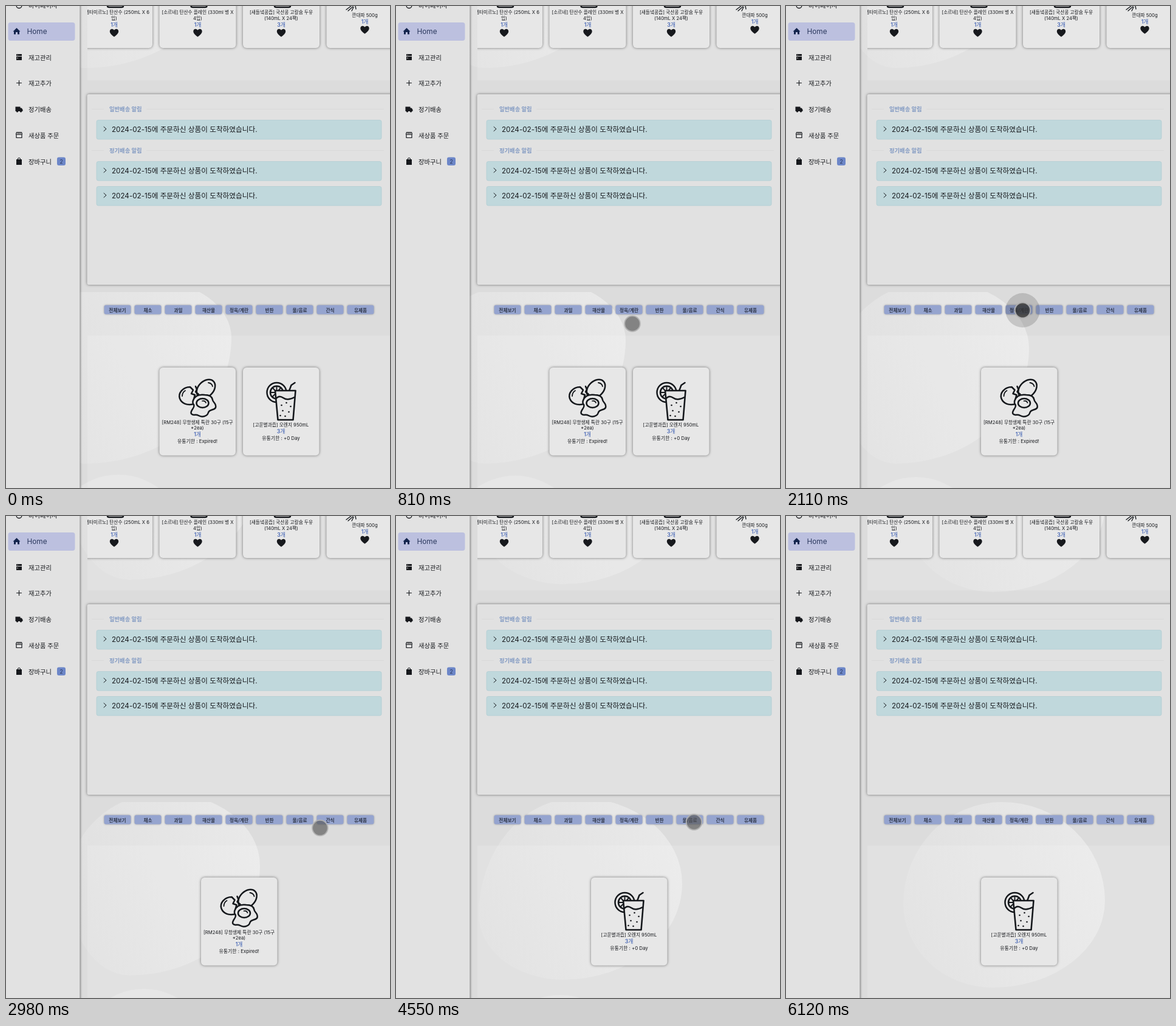
An HTML page that plays this animation: 632 px wide and 792 px high, repeating every 6190 ms.

```html
<!DOCTYPE html>
<html lang="ko">
<head>
<meta charset="utf-8">
<title>재고 알림</title>
<style>
html, body { margin: 0; width: 100%; height: 100%; overflow: hidden; background: #dcdcdc; }
svg { display: block; width: 632px; height: 792px; font-family: Inter, "Noto Sans CJK KR", "Noto Sans CJK", sans-serif; fill: #17191d; }
.mid { text-anchor: middle; }
.line { fill: none; stroke: #14171b; stroke-width: 2.5; stroke-linejoin: round; stroke-linecap: round; }
.card { fill: #e7e7e7; filter: drop-shadow(0 .5px 2px rgba(0,0,0,.5)); }
</style>
</head>
<body>
<svg id="stage" viewBox="0 0 632 792"></svg>
<script>
const LOOP = 6190;

const text = (x, y, size, content, extra = '') =>
  `<text x="${x}" y="${y}" font-size="${size}" ${extra}>${content}</text>`;
const centered = (x, y, size, content, extra = '') => text(x, y, size, content, `class="mid" ${extra}`);
const amount = (x, y, count) => centered(x, y, 8.8, count + '개', 'font-weight="500" fill="#3458b0"');
const rect = (x, y, w, h, r, extra) =>
  `<rect x="${x}" y="${y}" width="${w}" height="${h}" rx="${r}" ${extra}/>`;
const line = (d, width = 2.5, fill = 'none') =>
  `<path class="line" d="${d}" style="stroke-width:${width};fill:${fill}"/>`;

const heart = (x, y) => `<path transform="translate(${x} ${y})"
  d="M0 6.8C-3 4.6-7.2 1.5-7.2-2.4C-7.2-7-2-7.6 0-4.2C2-7.6 7.2-7 7.2-2.4C7.2 1.5 3 4.6 0 6.8Z"/>`;

function favorite(x, names, count, top = 0) {
  const titles = names.map((name, i) => centered(x, 13 + top + i * 10, 7.7, name)).join('');
  const countY = top ? 28.5 : 33.5;
  const icon = top
    ? line('M560 6L568 0M563 8L571 1M569 8L572 2M576 5L575 0', 1.3)
    : line(`M${x - 11}-8V0Q${x - 11} 2 ${x - 8} 2H${x + 12}Q${x + 15} 2 ${x + 15} 0V-8`);
  return rect(x - 63, -80, 126, 149, 6, 'class="card"') + icon + titles +
    amount(x, countY, count) + heart(x, countY + 10.5);
}

const eggs =
  '<ellipse class="line" cx="77" cy="35" rx="12.5" ry="17.5" transform="rotate(45 77 35)"/>' +
  line('M81 25Q87 26 88 31', 1.8) +
  line('M51 32C39 32 31 42 34 51C37 59 46 63 57 60M51 32L56 37L53 43L59 45L57 52', 2.5, '#e7e7e7') +
  line('M38 47Q38 41 43 38', 1.8) + line('M60 31L62 36L60 40L65 44') +
  line(`M56 54C59 46 67 44 75 45C82 45 87 47 88 53C88 57 95 59 93 66C90 71 83 68 81 74
    C79 81 70 82 65 79C60 76 56 80 53 76C50 71 60 66 57 61C55 59 55 57 56 54Z`, 2.5, '#e7e7e7') +
  '<ellipse class="line" cx="71.5" cy="58.5" rx="10" ry="7.5"/>' + line('M71 55Q76 54 77 58', 1.7);

const bubbles = [[64, 62], [72, 58], [79, 64], [66, 71], [76, 73], [70, 80], [62, 79]]
  .map(([x, y]) => `<circle cx="${x}" cy="${y}" r="1.3"/>`).join('');
const juice =
  '<circle class="line" cx="56" cy="41" r="16"/><circle class="line" cx="56" cy="41" r="10.5"/>' +
  line('M56 41H46M56 41L49 33M56 41V31M56 41L63 33M56 41L49 48', 1.9) +
  line('M53.5 38H87L83 86H58Z', 2.6, '#e7e7e7') +
  line('M55 51Q60 45 67 50T85 49') + line('M77 37L80 29L86 25') + bubbles;

function stock(id, icon, names, count, expiry) {
  const first = names.length > 1 ? 92.5 : 97;
  const last = first + 9.5 * (names.length - 1);
  return `<g id="${id}">` + rect(.5, 0, 125.5, 144.5, 6, 'class="card"') + icon +
    names.map((name, i) => centered(63, first + 9.5 * i, 7.7, name)).join('') +
    amount(63, last + 11, count) +
    centered(63, last + 22, 7.9, '유통기한 : ' + expiry) + '</g>';
}

function alertBar(y) {
  return rect(149, y + .5, 469, 31.5, 3, 'fill="#c0d8dc" stroke="#a8cad0" stroke-width=".6"') +
    line(`M161 ${y + 11.5}L165 ${y + 15}L161 ${y + 18.5}`, 1) +
    text(174, y + 19.8, 11.65, '2024-02-15에 주문하신 상품이 도착하였습니다.');
}
const legend = (y, label) =>
  `<path d="M141 ${y}H161M231 ${y}H622" stroke="#d9d9d9"/>` +
  text(170, y + 3.7, 9.3, label, 'font-weight="700" fill="#8199c2"');

const menuIcons = [
  '<path d="M17 79h9v3h-9zM17 83h9v6h-9z"/><path d="M19 80v1M19 84.5v2" stroke="#e2e2e2"/>',
  line('M17.5 126.5H25.5M21.5 122.5V130.5', 1.1),
  '<path d="M15.5 165.5H23.5V167.5H25.5L27.5 170V173H15.5Z"/><circle cx="18.5" cy="173" r="1.7"/><circle cx="24.5" cy="173" r="1.7"/>',
  line('M17 212V216.5H26V212M16.5 211L17.5 207.5H25.5L26.5 211ZM20 208V211M23 208V211', 1.2),
  '<path d="M17 252H26V261H17Z"/>' + line('M19.5 254V251Q21.5 248 23.5 251V254', 1.1)
].join('');
const menu = ['재고관리', '재고추가', '정기배송', '새상품 주문', '장바구니']
  .map((label, i) => text(37, 88.5 + 42.8 * i, 10.3, label)).join('');

const sidebar = rect(-5, -5, 126.5, 802, 0, 'fill="#e2e2e2" style="filter:drop-shadow(1px 0 1.5px rgba(0,0,0,.5))"') +
  text(37, 3, 10.3, '마이페이지') + '<circle class="line" cx="21.5" cy="-1" r="4.5" style="stroke-width:1.3"/>' +
  rect(3.5, 27, 110, 30, 4, 'fill="#bcc0df"') +
  '<path d="M11.5 42L17.5 36L23.5 42H22V46.5H19V43H16V46.5H13V42Z" fill="#14254d"/>' +
  text(34.5, 46, 11.8, 'Home', 'fill="#2b395e"') + menuIcons + menu +
  rect(84, 248.5, 14, 13.5, 3, 'fill="#6d87c8"') + centered(91, 258.5, 8.5, '2', 'fill="#26365f"');

const chips = ['전체보기', '채소', '과일', '해산물', '정육/계란', '반찬', '물/음료', '간식', '유제품']
  .map((label, i) => rect(161.5 + 50 * i, 491.5, 44, 15, 3,
    'fill="#95a4cf" style="filter:drop-shadow(0 .5px 1.5px rgba(0,0,0,.3))"') +
    centered(183.5 + 50 * i, 502.7, 7.7, label, 'font-weight="600" fill="#30374a"')).join('');

const stage = document.getElementById('stage');
stage.innerHTML = `<defs>
  <linearGradient id="sheen" x1="0" y1=".75" x2="1" y2=".3">
    <stop offset="0" stop-color="#dfdfdf"/><stop offset="1" stop-color="#e9e9e9"/>
  </linearGradient>
  <clipPath id="lower"><rect y="470" width="632" height="322"/></clipPath>
  <clipPath id="content"><rect x="134" width="498" height="140"/></clipPath>
</defs>
<rect width="632" height="792" fill="#dcdcdc"/>
<path id="blobTop" transform="translate(0 -650)" fill="url(#sheen)"/>
<g clip-path="url(#lower)"><path id="blob" fill="url(#sheen)"/></g>
<circle id="blobNext" r="110" fill="#e3e3e3"/>
${rect(134, -5, 500, 127.5, 0, 'fill="#fff" opacity=".13"')}
${rect(134, 541.5, 500, 249.5, 0, 'fill="#fff" opacity=".13"')}
<g clip-path="url(#content)">
${favorite(178, ['[두벨타미르노] 탄산수 (250mL X 6', '입)'], 1)}
${favorite(315.5, ['[소르네] 탄산수 플레인 (330ml 병 X', '4입)'], 1)}
${favorite(453, ['[새들녘콩즙] 국산콩 고칼슘 두유', '(140mL X 24팩)'], 3)}
${favorite(590.5, ['깐대파 500g'], 1, 5)}
</g>
${rect(133.5, 145, 510, 313, 3, 'fill="#e1e1e1" style="filter:drop-shadow(0 0 2px rgba(0,0,0,.5))"')}
${legend(169.5, '일반배송 알림')}${alertBar(187)}
${legend(237.5, '정기배송 알림')}${alertBar(255)}${alertBar(296)}
${chips}
${stock('eggCard', eggs, ['[RM248] 무항생제 특란 30구 (15구', '*2ea)'], 1, 'Expired!')}
${stock('juiceCard', juice, ['[고운별과즙] 오렌지 950mL'], 3, '+0 Day')}
${sidebar}
<g id="pointer">
  <circle id="ripple" r="28" fill="#000" fill-opacity=".15" stroke="#000" stroke-opacity=".05"/>
  <circle r="12.8" fill="#555" fill-opacity=".66" stroke="#b2b2b2" stroke-opacity=".9" stroke-width="2"/>
  <circle id="press" r="11.5" fill="#222"/>
</g>`;

const el = id => document.getElementById(id);
const clamp = v => Math.max(0, Math.min(1, v));

// Rows are [time, ...values]; values between rows are interpolated.
function sample(rows, t) {
  const next = rows.findIndex(row => row[0] > t);
  if (next === 0) return rows[0].slice(1);
  if (next < 0) return rows[rows.length - 1].slice(1);
  const a = rows[next - 1], b = rows[next];
  const k = (t - a[0]) / (b[0] - a[0]);
  return a.slice(1).map((v, i) => v + (b[i + 1] - v) * k);
}

// time, right, rightY, top, topX, left, leftY, bottom, bottomX
const blobKeys = [
  [0, 371, 545, 450, 235, 40, 560, 752, 130],
  [810, 378, 549, 451, 238, 50, 570, 752, 145],
  [2110, 400, 562, 452, 248, 85, 595, 752, 180],
  [2980, 418, 574, 455, 260, 102, 605, 755, 203],
  [3790, 442, 590, 458, 275, 119, 622, 756, 237],
  [4550, 471, 604, 463, 300, 136, 655, 762, 275],
  [6120, 525, 632, 470, 355, 193, 637, 775, 340]
];
const nextKeys = [[0, 185, 770], [2110, 214, 774], [2980, 227, 777],
  [3790, 250, 781], [4550, 270, 787], [6120, 330, 800]];
const pointerKeys = [[0, 389, 522], [1100, 389, 522], [1570, 389.5, 500], [2350, 389.5, 500],
  [2800, 514, 514], [3050, 518, 512], [3500, 492, 503.5], [4550, 490.5, 503]];

function blobPath(t) {
  const [r, ry, top, tx, l, ly, b, bx] = sample(blobKeys, t);
  const arc = (w, h, x, y) => `A${w} ${h} 0 0 1 ${x} ${y}`;
  return `M${tx} ${top}` + arc(r - tx, ry - top, r, ry) + arc(r - bx, b - ry, bx, b) +
    arc(bx - l, b - ly, l, ly) + arc(tx - l, ly - top, tx, top) + 'Z';
}

function place(id, x, visible) {
  el(id).setAttribute('transform', `translate(${x} 594)`);
  el(id).style.display = visible ? '' : 'none';
}

function draw(t) {
  const path = blobPath(t);
  el('blob').setAttribute('d', path);
  el('blobTop').setAttribute('d', path);
  const [nx, ny] = sample(nextKeys, t);
  el('blobNext').setAttribute('cx', nx);
  el('blobNext').setAttribute('cy', ny + 110);

  const filtered = t >= 2040, drinks = t >= 4340;
  place('eggCard', filtered ? 320.5 : 252, !drinks);
  place('juiceCard', filtered ? 320.5 : 389.5, !filtered || drinks);

  const [px, py] = sample(pointerKeys, t);
  const pulse = start => clamp((t - start) / 90) * clamp((start + 330 - t) / 110);
  const pressed = Math.max(pulse(1980), pulse(4190));
  el('pointer').setAttribute('transform', `translate(${px} ${py})`);
  el('pointer').setAttribute('opacity', clamp((t - 600) / 120) * clamp((5550 - t) / 150));
  el('ripple').setAttribute('opacity', pressed);
  el('press').setAttribute('opacity', pressed * .5);
}

const start = performance.now();
function tick() {
  draw((performance.now() - start) % LOOP);
  requestAnimationFrame(tick);
}
tick();
</script>
</body>
</html>
```
